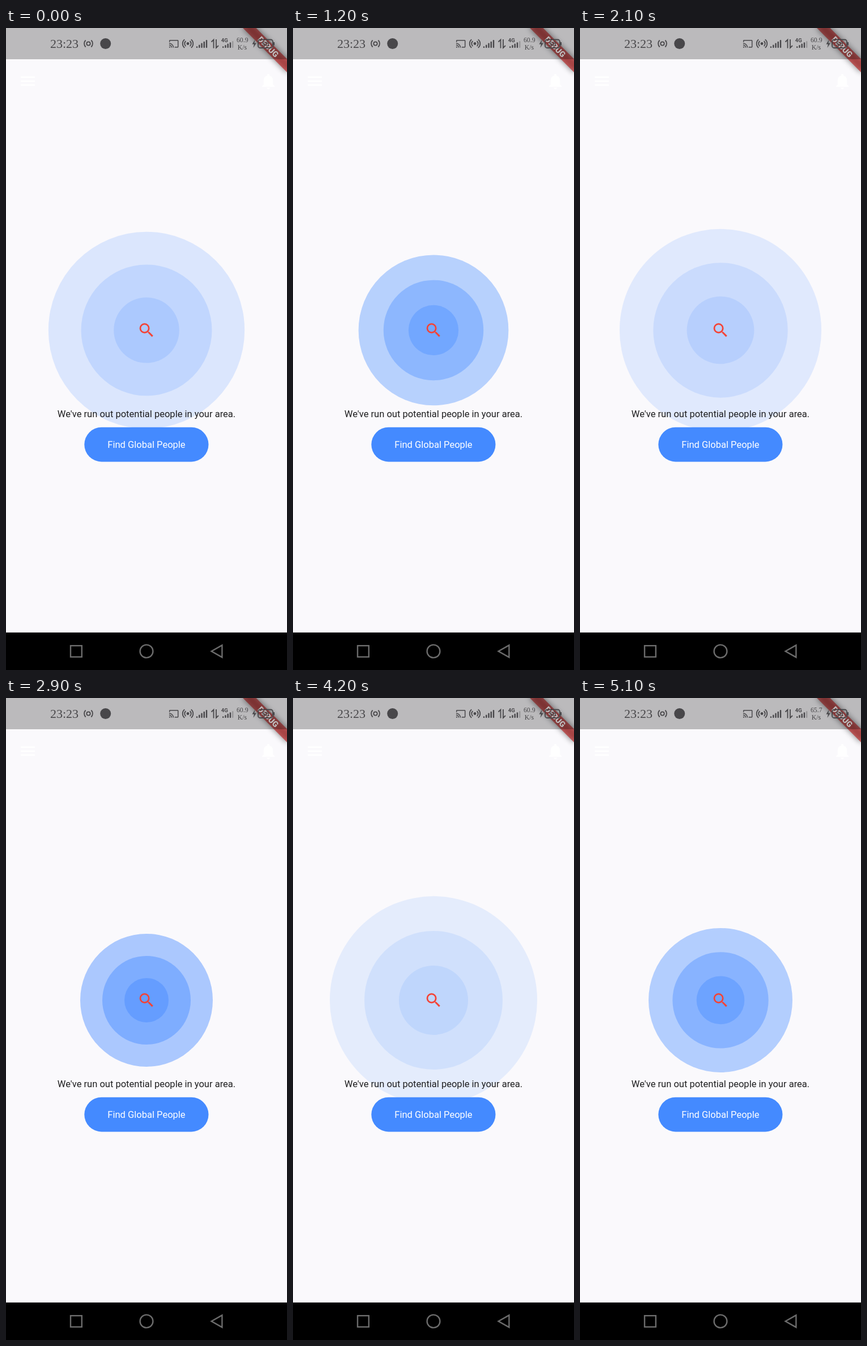
Recreate the animation shown at these times as an HTML page. Size 496 by 1130 pixels, loop 5200 ms.

```html
<!DOCTYPE html>
<html lang="en">
<head>
<meta charset="utf-8">
<title>Searching nearby</title>
<style>
  html, body { margin: 0; width: 100%; height: 100%; overflow: hidden; background: #faf9fc; }
  svg { display: block; width: 100%; height: 100%; }
  text { font-family: Roboto, sans-serif; font-size: 16.53px; text-anchor: middle; }
  .clock { font: 22px "Liberation Serif", serif; text-anchor: start; }
  .rate { font: 11.8px "Liberation Serif", serif; }
  .net { font: bold 9.5px Roboto, sans-serif; }
  .level { font: bold 11px Roboto, sans-serif; }
  .debug { font: 900 10.2px Roboto, sans-serif; }
  .line { fill: none; stroke: #48474a; stroke-width: 1.8; }
</style>
</head>
<body>
<svg viewBox="0 0 496 1130">
  <defs>
    <filter id="soft" x="-30%" y="-150%" width="160%" height="400%">
      <feGaussianBlur stdDeviation="3.96"/>
    </filter>
  </defs>
  <rect width="496" height="1130" fill="#faf9fc"/>

  <!-- app bar icons -->
  <g fill="#fff">
    <path transform="translate(22.1 77) scale(1.378)" d="M3 18h18v-2H3v2zm0-5h18v-2H3v2zm0-7v2h18V6H3z"/>
    <path transform="translate(446.5 77.4) scale(1.378)" d="M12 22c1.1 0 2-.9 2-2h-4c0 1.1.9 2 2 2zm6-6v-5c0-3.07-1.64-5.64-4.5-6.32V4c0-.83-.67-1.5-1.5-1.5s-1.5.67-1.5 1.5v.68C7.63 5.36 6 7.92 6 11v5l-2 2v1h16v-1l-2-2z"/>
  </g>

  <g id="rings" fill="#448aff"></g>
  <path fill="#f44336" transform="translate(231.5 515.4) scale(1.378)" d="M15.5 14h-.79l-.28-.27A6.47 6.47 0 0 0 16 9.5 6.5 6.5 0 1 0 9.5 16c1.61 0 3.09-.59 4.23-1.57l.27.28v.79l5 4.99L20.49 19l-4.99-5zm-6 0a4.5 4.5 0 1 1 0-9 4.5 4.5 0 0 1 0 9z"/>
  <text x="248" y="685" fill="#1f1f20">We've run out potential people in your area.</text>
  <rect x="138.3" y="702.8" width="219.2" height="60.6" rx="30.3" fill="#448aff"/>
  <text x="248" y="738.8" fill="#fff">Find Global People</text>

  <!-- corner banner -->
  <g transform="translate(496 0) scale(1.378) rotate(45)">
    <rect x="-40" y="28" width="80" height="12" fill="#000" opacity=".5" filter="url(#soft)"/>
    <rect x="-40" y="28" width="80" height="12" fill="#b71c1c" opacity=".627"/>
    <text class="debug" y="37.6" fill="#fff">DEBUG</text>
  </g>

  <!-- status bar -->
  <rect width="496" height="55" opacity=".256"/>
  <g fill="#48474a">
    <text class="clock" x="78" y="34.5">23:23</text>
    <g class="line">
      <circle cx="145.5" cy="27.5" r="3.2"/>
      <path d="M140.6 21.5a8.4 8.4 0 0 0 0 12M150.4 21.5a8.4 8.4 0 0 1 0 12"/>
    </g>
    <circle cx="175.7" cy="27.5" r="9.5"/>
    <path transform="translate(287.2 18.7) scale(.75)" d="M21 3H3c-1.1 0-2 .9-2 2v3h2V5h18v14h-7v2h7c1.1 0 2-.9 2-2V5c0-1.1-.9-2-2-2zM1 18v3h3c0-1.66-1.34-3-3-3zm0-4v2c2.76 0 5 2.24 5 5h2c0-3.87-3.13-7-7-7zm0-4v2c4.97 0 9 4.03 9 9h2c0-6.08-4.93-11-11-11z"/>
    <circle cx="321" cy="27.5" r="2.4"/>
    <path class="line" d="M317.4 23a5.8 5.8 0 0 0 0 9M324.6 23a5.8 5.8 0 0 1 0 9M315.2 20.3a9.2 9.2 0 0 0 0 14.4M326.8 20.3a9.2 9.2 0 0 1 0 14.4"/>
    <g id="bars"></g>
    <path class="line" d="M362.5 24.5l4-3.8V35.5M371 20v14.8l4-3.8"/>
    <text class="net" x="385.7" y="24.5">4G</text>
    <text class="rate" id="rate" x="417.3" y="25.3"></text>
    <text class="rate" x="417" y="38.3">K/s</text>
    <path d="M439.5 20.5l-5 8h3.4l-1.4 6.5 5.4-8.6h-3.5z"/>
    <rect class="line" x="445" y="20.5" width="26" height="14.5" rx="3.5"/>
    <rect x="472" y="25" width="2" height="5.5"/>
    <text class="level" x="458" y="31.8">50</text>
  </g>

  <!-- navigation bar -->
  <rect y="1064" width="496" height="66"/>
  <g fill="none" stroke="#6c6c6c" stroke-width="2.4">
    <rect x="114" y="1087.2" width="19.8" height="19.8"/>
    <circle cx="248" cy="1097" r="11.4"/>
    <path d="M362.6 1097l18.8-10.6v21.2z"/>
  </g>
</svg>
<script>
  const LOOP = 5200, STEP = 100;
  const PULSE = { period: 2003, lead: 1653, start: 89.2, speed: 0.0508, fade: 208 };
  const NS = "http://www.w3.org/2000/svg";

  function add(parent, tag, attrs) {
    const el = document.createElementNS(NS, tag);
    for (const key in attrs) el.setAttribute(key, attrs[key]);
    return document.getElementById(parent).appendChild(el);
  }

  function signal(x, gap, count, low, rise, faint) {
    for (let i = 0; i < count; i++) {
      const height = low + rise * i;
      add("bars", "rect", {
        x: x + gap * i, y: 35 - height, width: 2.4, height, rx: 1,
        opacity: i === faint ? 0.3 : 1
      });
    }
  }
  signal(335.8, 4.25, 5, 2.8, 2.8, -1);
  signal(382, 4.25, 5, 2.8, 2.3, 4);

  const rings = [3, 2, 1].map(n => ({
    share: n / 3,
    el: add("rings", "circle", { cx: 248, cy: 531.9 })
  }));
  const rate = document.getElementById("rate");

  function draw(time) {
    const t = Math.floor((time % LOOP) / STEP) * STEP;
    const phase = (t + PULSE.lead) % PULSE.period;
    const radius = PULSE.start + PULSE.speed * phase;
    for (const { share, el } of rings) {
      el.setAttribute("r", radius * share);
      el.setAttribute("opacity", 1 - radius / PULSE.fade);
    }
    rate.textContent = t < 4500 ? "60.9" : "65.7";
  }

  const begin = performance.now();
  function tick() {
    draw(performance.now() - begin);
    requestAnimationFrame(tick);
  }
  tick();
</script>
</body>
</html>
```
